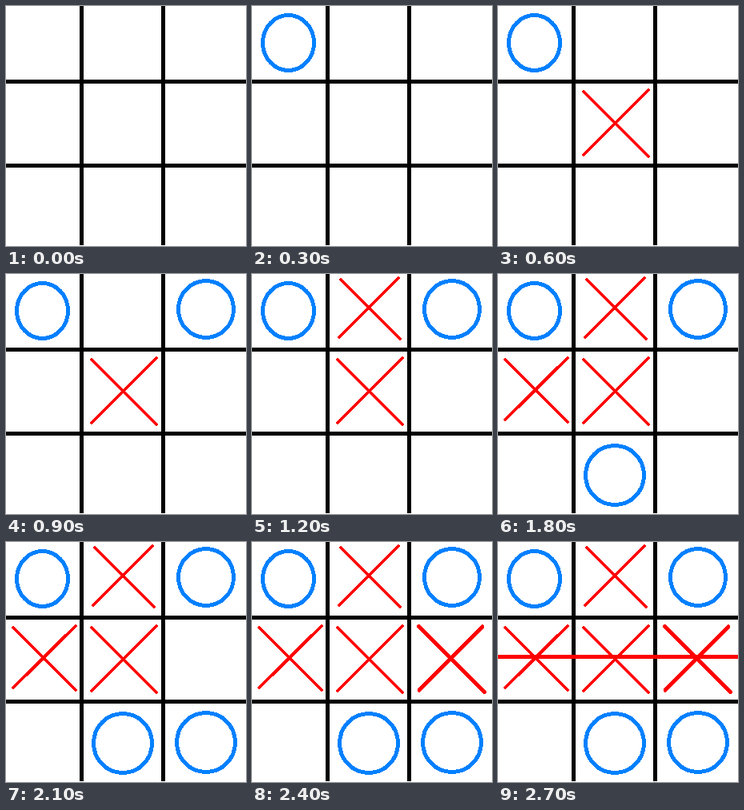
Recreate the animation shown at these times as an HTML page. Size 300 px wide and 300 px high, loop 3 s.

```html
<!DOCTYPE html>
<html>
<head>
<meta charset="utf-8">
<style>
html, body { margin: 0; width: 100%; height: 100%; overflow: hidden; background: #fff; }
svg { display: block; width: 100vw; height: 100vh; }
path, ellipse { fill: none; stroke-width: 5; stroke-linecap: round; shape-rendering: crispEdges; }
.grid { stroke: #000; }
.o { stroke: #0080ff; }
.x { stroke: #f00; stroke-width: 4; }
.bold { stroke-width: 5; }
</style>
</head>
<body>
<svg viewBox="0 0 300 300">
  <path class="grid" d="M94.5 0V297M196.5 0V297M0 94.5H300M0 199.5H300"/>
  <g id="moves">
    <ellipse class="o" cx="45.5" cy="46" rx="32" ry="34.5"/>
    <path class="x" d="M107 107L188 188M188 105L107 186"/>
    <ellipse class="o" cx="250" cy="44" rx="34.5" ry="35.5"/>
    <path class="x" d="M111 7L185 81M183 5L109 79"/>
    <ellipse class="o" cx="146" cy="251.5" rx="36.5" ry="37"/>
    <path class="x" d="M9 107L87 185M87 105L9 182"/>
    <ellipse class="o" cx="250" cy="250.5" rx="36.5" ry="37"/>
    <path class="x bold" d="M208.5 105.5L290.5 187.5M288 106L209 185"/>
    <path class="x bold" d="M0 143.5H300"/>
  </g>
</svg>
<script>
const STEP = 300, LOOP = 3000;
const moves = [...document.getElementById('moves').children];
const start = performance.now();

function draw(now) {
  const shown = Math.floor(Math.max(0, now - start) % LOOP / STEP);
  moves.forEach((move, i) => move.setAttribute('visibility', i < shown ? 'visible' : 'hidden'));
  requestAnimationFrame(draw);
}
draw(start);
</script>
</body>
</html>
```
